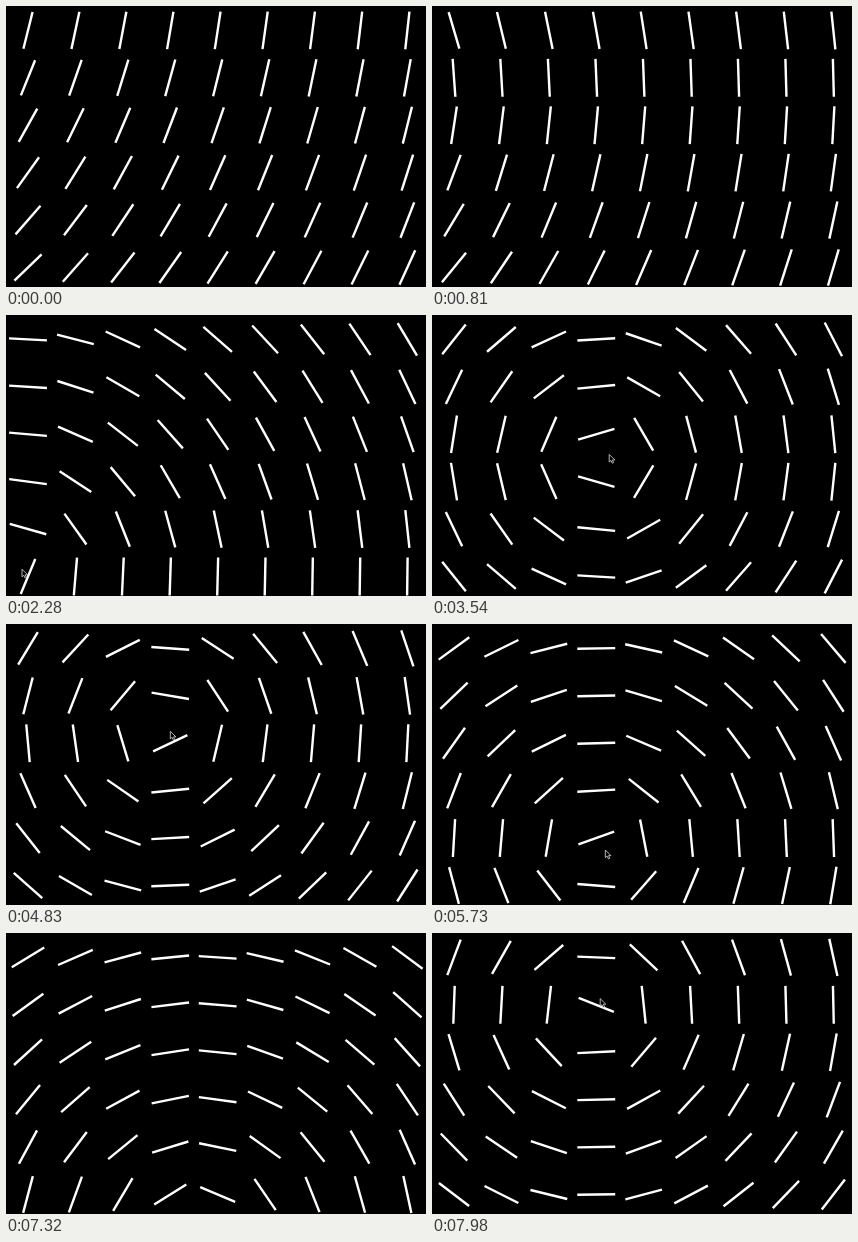
Write an HTML page that moves like this. It is 420 by 281 pixels and loops after 8000 ms.

```html
<!DOCTYPE html>
<html lang="en">
<head>
<meta charset="utf-8">
<title>Line field</title>
<style>
html, body { margin: 0; width: 100%; height: 100%; overflow: hidden; background: #000; }
svg { display: block; width: 420px; height: 281px; }
</style>
</head>
<body>
<svg viewBox="0 0 420 281">
  <g id="field" stroke="#fff" stroke-width="2.4"></g>
  <path id="cursor" d="M0 0V7.6L1.8 6.1L3.1 8.8L4.4 8.2L3.2 5.6H5.6Z" fill="#000" stroke="#ddd" stroke-width=".8"/>
</svg>
<script>
const LOOP = 8000, STEP = 30;
const COLS = 9, ROWS = 6, GAP = 47.42, LEFT = 22, TOP = 24.4, HALF = GAP * 0.4;
const field = document.getElementById('field');
const cursor = document.getElementById('cursor');

// Path of the point all lines circle around: time, x, y
const path = [
  [0, -282, -51],
  [1470, -111, 189],
  [2280, 10, 256.5],
  [3540, 171.2, 142.7],
  [4830, 158.3, 106.7],
  [6600, 181, 344],
  [7250, 194, 322],
  [7980, 162.2, 77]
];

// Speed at a key, from its neighbours
function speed(i, axis) {
  const a = path[Math.max(i - 1, 0)], b = path[Math.min(i + 1, path.length - 1)];
  return (b[axis] - a[axis]) / (b[0] - a[0]);
}

// Smooth cubic through the keys
function focus(t, axis) {
  let i = 0;
  while (i < path.length - 2 && t >= path[i + 1][0]) i++;
  const a = path[i], b = path[i + 1];
  const span = b[0] - a[0], u = (t - a[0]) / span, v = 1 - u;
  return v * v * (1 + 2 * u) * a[axis] + u * u * (3 - 2 * u) * b[axis]
    + span * u * v * (v * speed(i, axis) - u * speed(i + 1, axis));
}

const lines = [];
for (let row = 0; row < ROWS; row++) {
  for (let col = 0; col < COLS; col++) {
    const x = LEFT + col * GAP, y = TOP + row * GAP;
    const el = document.createElementNS('http://www.w3.org/2000/svg', 'line');
    el.setAttribute('x1', -HALF);
    el.setAttribute('x2', HALF);
    field.append(el);
    lines.push({ el, x, y });
  }
}

function draw(t) {
  const fx = focus(t, 1), fy = focus(t, 2);
  for (const { el, x, y } of lines) {
    const angle = Math.atan2(fy - y, fx - x) * 180 / Math.PI + 90;
    el.setAttribute('transform', `translate(${x} ${y}) rotate(${angle})`);
  }
  // The pointer runs one step ahead vertically
  cursor.setAttribute('transform', `translate(${fx + 6} ${focus(t + STEP, 2) - 1.5})`);
}

const start = performance.now();
function tick() {
  const t = (performance.now() - start) % LOOP;
  draw(Math.floor(t / STEP) * STEP);
  requestAnimationFrame(tick);
}
tick();
</script>
</body>
</html>
```
